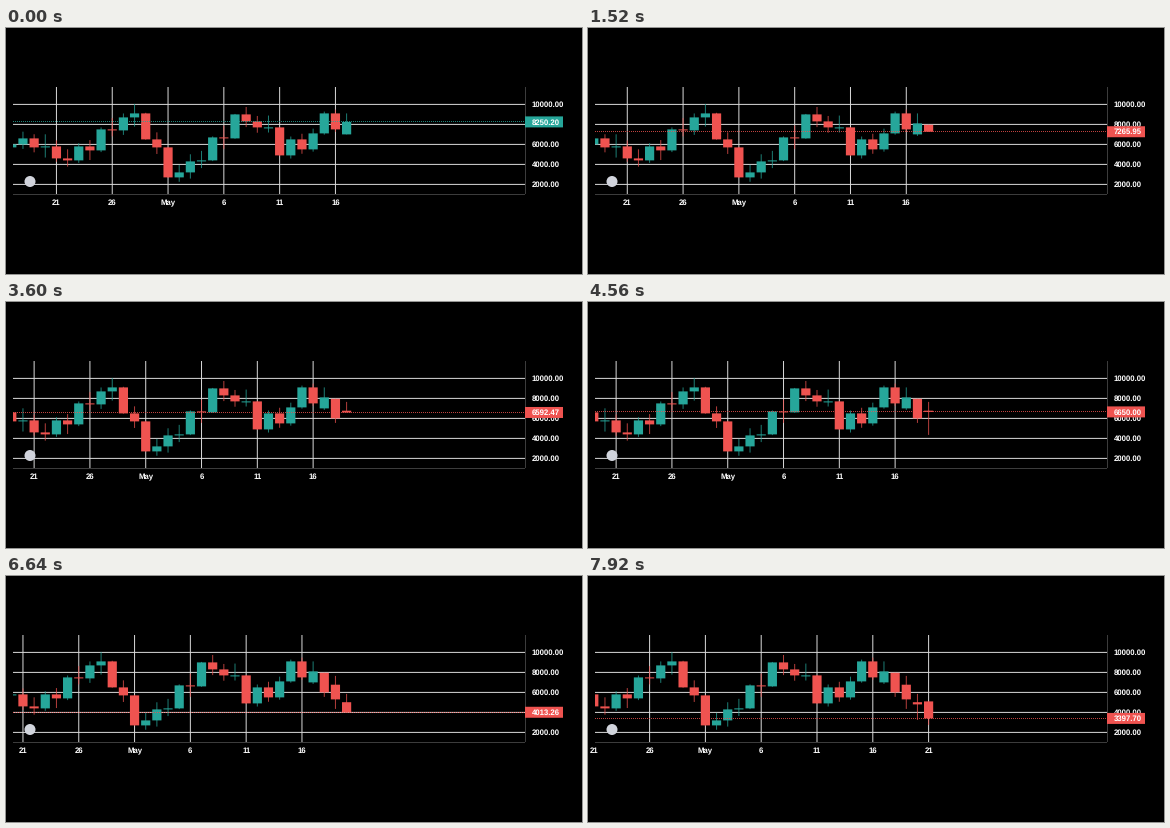
A matplotlib script that plays this animation: 576x246 px, repeating every 8 s.

```python
import random

import numpy as np
import matplotlib.pyplot as plt
from matplotlib.animation import FuncAnimation
from matplotlib.collections import PolyCollection
from matplotlib.patches import Circle, Rectangle

W, H, DPI = 576, 246, 72
FRAMES, INTERVAL = 100, 80
LEFT, RIGHT, TOP, BOTTOM = 7, 519, 59, 166
LAST_X, STEP, BODY_W = 340.6, 11.16, 9.2
UP, DOWN = "#26a69a", "#ef5350"
GRID, BORDER = "#d8d8d8", "#3c3c3c"

# Daily closes in hundreds; every candle opens at the close before it.
CLOSES = [57, 60, 66, 57, 58, 46, 44, 58, 54, 75, 74, 87, 91, 65, 57, 27,
          32, 43, 44, 67, 66, 90, 83, 77, 77, 49, 65, 55, 71, 91, 75]

# Turning points (frame, price) of each live candle, from open to close.
LIVE = [
    [(-4, 70), (-2, 91), (0, 82.502), (4, 88.5), (8, 68.5), (12, 81)],
    [(13, 79.6), (19, 72.6595), (26, 78.5), (29, 62.5), (32, 71.22),
     (36, 55.5), (38, 60)],
    [(39, 67.7), (42, 76.5), (45, 65.9247), (52, 43.5), (57, 66.5), (63, 53)],
    [(64, 50.2), (68, 39.7651), (76, 58.5), (83, 40.1326), (85, 32.5), (88, 48)],
    [(89, 51), (96, 27.5), (99, 33.977)],
]

# One label every fifth candle.
DAYS = ["21", "26", "May", "6", "11", "16", "21"]
DAY_AT = [4 + 5 * i for i in range(len(DAYS))]


def past_candles():
    rng = random.Random(4)
    candles = []
    for start, end in zip(CLOSES, CLOSES[1:]):
        # Long bodies leave short wicks.
        reach = 12 * max(0.05, 1 - abs(end - start) / 25)
        high = max(start, end) + reach * rng.uniform(0.5, 1.1)
        low = min(start, end) - reach * rng.uniform(0.4, 1)
        candles.append((start, high, low, end))
    return candles


def live_candles(frame):
    candles = []
    for points in LIVE:
        start, end = points[0][0], points[-1][0]
        if start <= frame:
            times = np.arange(start, min(frame, end) + 1)
            seen = np.interp(times, *zip(*points))
            candles.append((seen[0], seen.max(), seen.min(), seen[-1]))
    return candles


def y_of(price):
    return 176.4 - price


def box(x, y0, y1, w):
    """Corners of an upright box centred on x."""
    return [(x - w / 2, y0), (x + w / 2, y0), (x + w / 2, y1), (x - w / 2, y1)]


plt.rcParams.update({"font.family": "Liberation Sans", "font.weight": "bold",
                     "font.size": 7.7, "text.hinting": "none", "toolbar": "None"})
fig = plt.figure(figsize=(W / DPI, H / DPI), dpi=DPI, facecolor="black")
ax = fig.add_axes([0, 0, 1, 1])
ax.set(xlim=(0, W), ylim=(H, 0))
ax.axis("off")
pane = Rectangle((LEFT, 0), RIGHT - LEFT, H, transform=ax.transData)


def rect(x, y, w, h, color, z=1):
    return ax.add_patch(Rectangle((x, y), w, h, fc=color, lw=0, zorder=z, snap=False))


def label(x, y, text, z=2, **style):
    return ax.text(x, y, text, color="white", va="baseline", zorder=z, **style)


def polys(z, **style):
    group = PolyCollection([], lw=0, zorder=z, snap=False, **style)
    ax.add_collection(group, autolim=False)
    group.set_clip_path(pane)
    return group


for price in range(20, 101, 20):
    rect(LEFT, y_of(price) - 0.5, RIGHT - LEFT, 1, GRID)
    label(526, y_of(price) + 2.5, f"{price * 100:.2f}")
rect(RIGHT, TOP, 1, BOTTOM - TOP, BORDER)
rect(LEFT, BOTTOM, RIGHT - LEFT, 1, BORDER)
ax.add_patch(Circle((24, 153.5), 5.5, fc="#d1d4dc", lw=0, zorder=8))

grid = polys(1, facecolor=GRID)
wicks = polys(3, alpha=0.75)
bodies = polys(4)
day_texts = [label(0, 177.4, day, ha="center") for day in DAYS]
for text in day_texts:
    text.set_clip_path(pane)

price_line, = ax.plot([LEFT, RIGHT], [0, 0], lw=1, ls=(0, (1, 1)), alpha=0.8,
                      dash_capstyle="butt", snap=False, zorder=5)
tag = rect(RIGHT, 0, 38, 11, UP, z=6)
tag_text = label(526, 0, "", z=7)
past = past_candles()


def draw(frame):
    candles = past + live_candles(frame)
    count = len(candles)
    xs = LAST_X - STEP * np.arange(count - 1, -1, -1)
    colors = [UP if end >= start else DOWN for start, _, _, end in candles]

    body_boxes, wick_boxes = [], []
    for x, (start, high, low, end) in zip(xs, candles):
        top, bottom = y_of(max(start, end)), y_of(min(start, end))
        body_boxes.append(box(x, top, max(bottom, top + 1), BODY_W))
        wick_boxes.append(box(x, y_of(high), y_of(low), 1))
    bodies.set_verts(body_boxes)
    wicks.set_verts(wick_boxes)
    bodies.set_facecolor(colors)
    wicks.set_facecolor(colors)

    grid.set_verts([box(xs[i], TOP, BOTTOM, 1) for i in DAY_AT if i < count])
    for i, text in zip(DAY_AT, day_texts):
        text.set_visible(i < count)
        if i < count:
            text.set_x(xs[i])

    price, color = candles[-1][3], colors[-1]
    y = y_of(price)
    price_line.set_ydata([np.floor(y) + 0.5] * 2)
    price_line.set_color(color)
    tag.set_y(y - 5.5)
    tag.set_facecolor(color)
    tag_text.set_y(y + 2.6)
    tag_text.set_text(f"{price * 100:.2f}")
    return []


anim = FuncAnimation(fig, draw, frames=FRAMES, interval=INTERVAL, repeat=True,
                     repeat_delay=0, init_func=lambda: draw(0))
plt.show()
```
